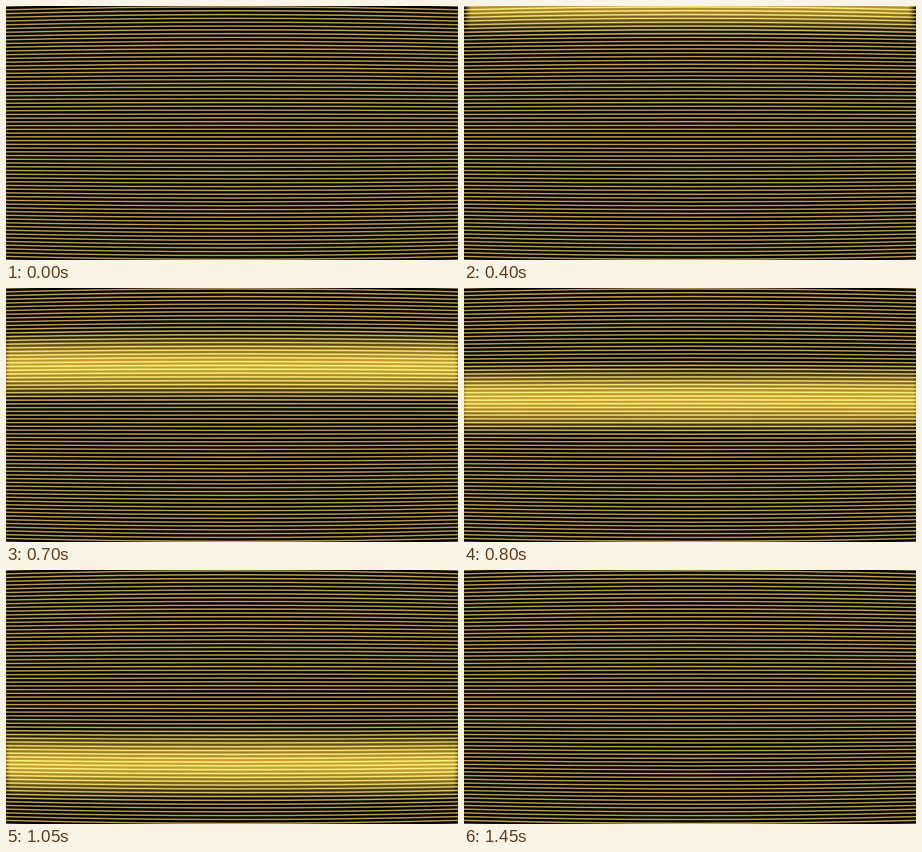
Animation, 998 px wide and 561 px high, one loop 1500 ms. Source, as an HTML page with a canvas:

```html
<!DOCTYPE html>
<html lang="en">
<head>
<meta charset="utf-8">
<title>Scanning glow</title>
<style>
  html, body { margin: 0; width: 100%; height: 100%; overflow: hidden; background: #000; }
  canvas { display: block; width: 998px; height: 561px; }
</style>
</head>
<body>
<canvas id="stage" width="998" height="561"></canvas>
<script>
const W = 998, H = 561, MID = 280.7;
const LOOP = 1500, STEP = 50;
const PITCH = 8.447, BULGE = 0.0233;
const REACH = 95;
const LINE = [186, 157, 75], HOT = [255, 246, 122];

const ctx = document.getElementById('stage').getContext('2d');

function layer() {
  const c = document.createElement('canvas');
  c.width = W;
  c.height = H;
  return c.getContext('2d');
}

const mix = (a, b, k) => `rgb(${a.map((v, i) => Math.round(v + (b[i] - v) * k)).join(',')})`;
const smooth = k => k * k * (3 - 2 * k);

// Barrel-shaped scan lines: each is a shallow parabola around the middle row.
const lines = new Path2D();
for (let i = -34; i <= 34; i++) {
  const d = i * PITCH;
  const edge = MID + d * (1 - BULGE);
  const top = MID + d * (1 + BULGE);
  lines.moveTo(0, edge);
  lines.quadraticCurveTo(W / 2, top, W, edge);
}

function strokeLines(c, style) {
  c.lineWidth = 3.1;
  c.strokeStyle = style;
  c.stroke(lines);
}

const base = layer();
base.fillStyle = '#000';
base.fillRect(0, 0, W, H);
strokeLines(base, mix(LINE, HOT, 0));

// Soft left and right ends of the glow, rounder towards the corners.
const mask = layer();
for (let y = 0; y < H; y++) {
  const u = (y - MID) / MID;
  const e = -5 + 13 * u * u;
  const g = mask.createLinearGradient(0, 0, W, 0);
  for (let x = 0; x <= 24; x += 4) {
    const k = Math.min(1, Math.max(0, (x - e + 12) / 24));
    const color = `rgba(0,0,0,${smooth(k)})`;
    g.addColorStop(x / W, color);
    g.addColorStop(1 - x / W, color);
  }
  mask.fillStyle = g;
  mask.fillRect(0, y, W, 1);
}

const glow = layer();

function bandGradient(y, from, to, power) {
  const g = glow.createLinearGradient(0, y - REACH, 0, y + REACH);
  for (let i = 0; i <= 24; i++) {
    const k = Math.sin(Math.PI * i / 24) ** 2;
    g.addColorStop(i / 24, mix(from, to, k ** power));
  }
  return g;
}

const bandY = t => MID + 392 * Math.sin(Math.PI * (t - 846) / 1640);

function draw(t) {
  const y = bandY(t);
  ctx.drawImage(base.canvas, 0, 0);

  glow.globalCompositeOperation = 'source-over';
  glow.fillStyle = bandGradient(y, [0, 0, 0], [205, 164, 57], 1);
  glow.fillRect(0, 0, W, H);
  strokeLines(glow, bandGradient(y, LINE, HOT, 0.75));
  glow.globalCompositeOperation = 'destination-in';
  glow.drawImage(mask.canvas, 0, 0);

  ctx.drawImage(glow.canvas, 0, 0);
}

let shown = -1;
function tick() {
  const t = Math.floor((performance.now() % LOOP) / STEP) * STEP;
  if (t !== shown) draw(shown = t);
  requestAnimationFrame(tick);
}
tick();
</script>
</body>
</html>
```
